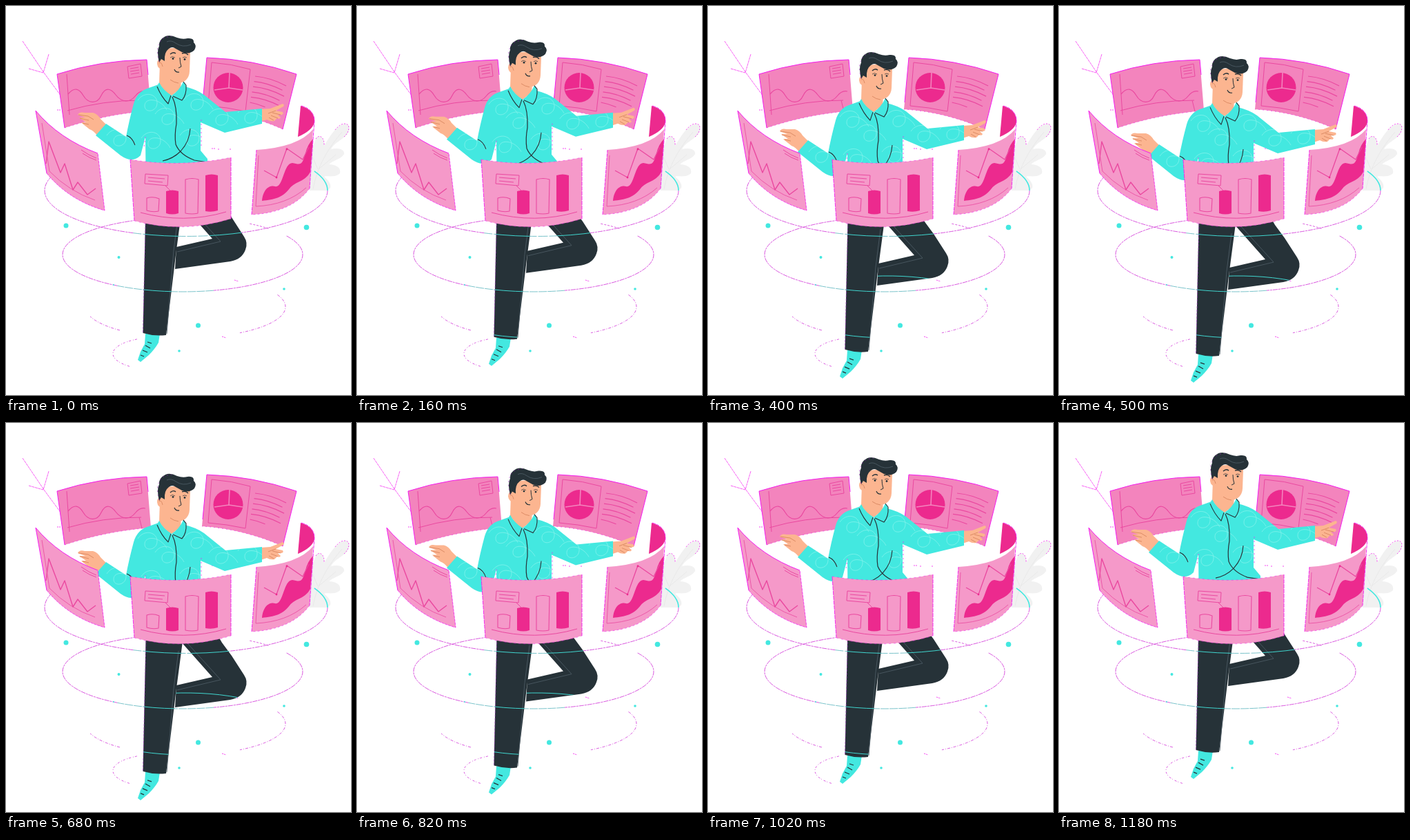
Recreate the animation shown at these times as an HTML page with a canvas. Size 500 by 565 pixels, loop 1.2 s.

```html
<!DOCTYPE html>
<html lang="en">
<head>
<meta charset="utf-8">
<title>Floating charts</title>
<style>
html, body { margin: 0; width: 100%; height: 100%; overflow: hidden; background: #fff; }
canvas { display: block; width: 500px; height: 565px; }
</style>
</head>
<body>
<canvas id="stage" width="500" height="565"></canvas>
<script>
const ctx = document.getElementById('stage').getContext('2d');
const LOOP = 1200, STEP = 20, DROP = 32.5;
const TEAL = '#43e8e0', TEAL_DIM = '#58b4bd', CURL = '#85f1eb', INK = '#263238', SEAM = '#4b5a62';
const SKIN = '#fcb590', SKIN_LINE = '#d98761';
const PINK = '#f599c9', PINK_BACK = '#f384bd', HOT = '#ec2a8e', LINE = '#ea49a0';
const FRINGE = '#f41cf0', RING = '#d02cd6';

function fill(d, color) {
  ctx.fillStyle = color;
  ctx.fill(new Path2D(d));
}
function line(d, color, width = 1, dash = []) {
  ctx.strokeStyle = color;
  ctx.lineWidth = width;
  ctx.setLineDash(dash);
  ctx.stroke(new Path2D(d));
  ctx.setLineDash([]);
}
function dot(x, y, r, color = TEAL) {
  ctx.fillStyle = color;
  ctx.beginPath();
  ctx.arc(x, y, r, 0, 7);
  ctx.fill();
}
// Angles are in degrees, clockwise from the right.
function orbit([x, y, rx, ry], from, to, color = RING, dash = [7, 1, 3, 1], width = 0.8) {
  ctx.strokeStyle = color;
  ctx.lineWidth = width;
  ctx.setLineDash(dash);
  ctx.beginPath();
  ctx.ellipse(x, y, rx, ry, 0, from * Math.PI / 180, to * Math.PI / 180);
  ctx.stroke();
  ctx.setLineDash([]);
}

const RING1 = [261, 268, 205, 66.5];
const RING2 = [256, 361, 174, 54];
const RING3 = [260, 437, 145, 45];
const RING4 = [222, 505, 67, 24];

const STANDING = 'M203 262L198.5 475Q215 480 232 478L246 362L256 286L258 262Z';
const BENT = 'M240 262H298L313 288L327 307L345 335Q351 344 347 354Q342 368 325 371L245 382L247 350L299 338L253 286Z';

function drawScenery() {
  line('M24 51L55 97L80 131', FRINGE, 0.7, [4, 0.6]);
  line('M33 91L54 97L62 70', FRINGE, 0.7, [4, 0.6]);
  line('M74 151H79M298 207H303M307 208H310M324 208H327M331 398L337 400M313 480L319 482', FRINGE, 0.8, [2, 1]);

  fill('M440 268C436 245 440 215 449 193C454 185 462 191 461 203C469 190 478 174 491 171C500 171 499 183 491 190C482 197 474 201 471 208C483 205 491 209 490 215C485 223 474 224 468 230C478 230 486 235 484 243C477 250 466 246 461 248C469 254 476 265 464 268Z', '#f1f1f1');
  line('M445 266C450 240 460 215 487 183M452 237L443 216M453 237L478 216', '#e6e6e6', 0.8);
  line('M449 193C454 185 462 191 461 203M477 180Q484 171 491 171C500 171 498 183 490 190', FRINGE, 0.8, [2, 2]);

  orbit(RING1, 0, 72);
  orbit(RING1, 72, 112, TEAL_DIM, [14, 2]);
  orbit(RING1, 112, 202);
  orbit(RING1, -25, 0, TEAL, [], 1.6);
  orbit(RING2, -30, 75);
  orbit(RING2, 75, 123, TEAL_DIM, [12, 1]);
  orbit(RING2, 123, 246);
  orbit(RING2, 304, 316, RING, [3, 2]);
  orbit(RING3, -23, 57, RING, [4, 2, 1, 2]);
  orbit(RING3, 131, 162, RING, [4, 2, 1, 2]);
  orbit(RING4, 130, 244, RING, [3, 3, 1, 2]);

  [[87, 319, 3.5], [435.5, 321.5, 3.8], [163.5, 365, 2], [278.5, 464, 3.5],
   [403, 411, 1.8], [251, 501, 1.8], [156, 405, 1]].forEach(d => dot(...d));
}

function drawBackPanels() {
  fill('M74 99Q136 79 204 78L210 152Q145 157 85 177Z', PINK_BACK);
  line('M85 177L74 99Q136 79 204 78L206 100', FRINGE, 1);
  line('M85 177Q145 157 210 152', FRINGE, 0.6, [2, 4]);
  line('M88 99L92 158M89 152Q140 137 196 137M193 137L197 153', LINE);
  line('M90 128C99 117 106 120 112 130C119 142 132 143 138 130C145 116 153 121 159 129C168 141 180 140 187 131Q194 122 202 124', LINE, 1.2);
  line('M176 88L195 84L197 102L178 105ZM180 91L192 89M180 95L193 93M181 99L193 97', LINE);

  fill('M291 75Q357 77 421 99L401 179Q345 154 284 150Z', PINK_BACK);
  line('M285 140L291 75Q357 77 421 99L401 179', FRINGE, 1);
  line('M401 179Q345 154 284 150', FRINGE, 0.6, [2, 4]);
  line('M298 82Q327 84 354 92L347 153Q320 147 293 145Z', LINE);
  dot(322, 118.5, 21.5, HOT);
  line('M324 97L323 119L302 122M323 119L343 122', PINK_BACK, 1.6);
  for (let i = 0; i < 6; i++) {
    const x = 361 - i * 1.5, y = 102 + i * 7.6;
    const end = [45, 41, 45, 40, 43, 22][i];
    line(`M${x} ${y}q${end / 2} 2 ${end} ${end * 0.31}`, LINE, 1.2);
  }
}

function drawFrontPanels() {
  fill('M43 152Q77 193 133 214L143 297Q91 282 59 243Z', PINK);
  line('M133 214Q77 193 43 152L59 243', FRINGE, 1);
  line('M59 243Q91 282 143 297L133 214', FRINGE, 0.8, [4, 1]);
  line('M52 170L63 240Q91 269 129 282', LINE, 0.8);
  line('M58 229L62 197L79 242L85 229L97 267L104 256L118 274L130 265', LINE, 1.4);
  line('M109 209Q120 217 131 221M111 214Q121 221 131 224', LINE, 1);

  fill('M363 209Q424 205 445 179L440 265Q414 300 356 303Z', PINK);
  fill('M427 145Q448 151 447 169Q444 181 423 190Z', HOT);
  fill('M371 283C373 263 384 260 390 262C402 265 402 228 415 228C428 231 429 231 434 214Q437 201 445 193L441 241C433 256 420 254 411 265C400 279 389 281 371 283Z', HOT);
  line('M374 239L392 249L407 207L430 223L439 205', LINE, 1.3);
  dot(392, 249, 1.4, HOT);
  dot(407, 208, 1.4, HOT);
  line('M366 217L362 291Q407 289 435 264', LINE, 0.8);
  line('M356 303L363 209M428 145Q446 150 447 166L440 265', FRINGE, 0.9, [5, 1]);
  line('M440 265Q414 300 356 303', FRINGE, 0.6, [3, 3]);

  fill('M180 223Q253 235 326 220V309Q256 331 186 312Z', PINK);
  line('M180 223Q253 235 326 220M186 312Q256 331 326 309', FRINGE, 0.5, [3, 4]);
  line('M180 223L186 312M326 220V309', FRINGE, 0.9, [6, 1]);
  line('M202 244L235 246L234 261L201 258ZM206 249L230 251M206 254L227 256M231 261L238 268', LINE);
  line('M204 279Q213 276 222 280L221 298Q213 300 204 297Z', LINE, 1.1);
  line('M260 252Q270 249 279 252L278 301Q270 303 260 301Z', LINE, 1.1);
  fill('M232 269Q241 266 250 269V301Q241 304 232 301Z', HOT);
  fill('M289 246Q298 243 307 246V297Q298 300 289 298Z', HOT);
  line('M195 300Q258 317 319 299', LINE, 1);
}

function drawLegs(drop) {
  fill('M202 476H223L221 489Q216 498 207 507L195 517L191 514L195 502L201 491Z', TEAL);
  line('M205 488L211 490M202 493L209 497M198 500L205 503M195 507L200 509', INK, 1.2);
  fill(BENT, INK);

  ctx.save();
  ctx.clip(new Path2D(BENT));
  ctx.translate(0, -drop);
  orbit(RING3, 200, 340, TEAL, [], 0.9);
  ctx.restore();

  line('M262 288L311 342L248 357', SEAM, 0.9);
  fill(STANDING, INK);
  line('M250 300L243 355L233 476', SEAM, 0.9);
  line('M203 286L198.5 475', '#9a25bd', 0.6, [3, 2]);

  ctx.save();
  const legs = new Path2D(STANDING);
  legs.addPath(new Path2D(BENT));
  ctx.clip(legs);
  ctx.translate(0, -drop);
  for (const ring of [RING1, RING2, RING3]) orbit(ring, 20, 160, TEAL, [], 0.9);
  ctx.restore();
}

function drawHands() {
  fill('M104 158Q106 153 114 155L126 155Q133 157 137 164L146 173L132 188Q127 181 121 179L111 171L109 169L116 169L106 162L115 162Z', SKIN);
  line('M105 158L119 160L127 165M107 163L120 166M111 170L120 172', SKIN_LINE, 0.9);
  fill('M369 150L383 149L401 142Q404 143 402 146L391 152L401 154Q403 157 399 158L394 158L398 162Q397 165 393 163L389 167Q383 168 378 165L369 168Z', SKIN);
  line('M380 156L391 152M386 155L398 158M384 159L394 163M381 162L388 166', SKIN_LINE, 0.9);
}

function drawShirt() {
  const body = 'M221 114L207 119Q190 124 185 142Q178 168 174 190L145 171L130 188L166 217Q183 229 195 217L202 190L203 285H293L292 222L282 210V169L317 184L371 171V149L318 154L287 129Q276 121 259 117L241 131Z';
  fill(body, TEAL);

  ctx.save();
  ctx.clip(new Path2D(body));
  const curl = 'm-16 -6c9 -14 29 -10 28 5c-1 12 -18 14 -18 3c0 -13 23 -11 32 6';
  const curls = [[207, 143], [232, 163], [212, 198], [274, 142], [310, 164], [352, 161], [162, 194], [268, 194]];
  for (const [x, y] of curls) line(`M${x} ${y}${curl}`, CURL, 0.8);
  ctx.restore();

  line('M175 188Q183 191 187 202', INK, 1.1);
  line('M202 190L200 206M283 165V207', FRINGE, 0.7, [2, 4]);
  line('M241 132Q248 146 247 171Q244 187 246 201Q252 216 273 224L292 227', INK, 1.2);
  line('M267 178Q266 197 253 211Q242 222 227 225', INK, 1.1);
}

function drawHead(blink) {
  fill('M223 82L222 112Q229 124 240 130L253 120L254 106Z', SKIN);
  fill('M228 62L258 60L267 68L266 95Q265 110 250 112Q235 111 229 96Z', SKIN);
  fill('M230 77Q219 74 219 84Q220 93 230 92Z', SKIN);
  line('M222 83Q225 80 227 88', SKIN_LINE, 0.9);
  line('M238 107Q243 111 250 112', SKIN_LINE, 0.9);
  fill('M222 82Q218 66 222 58Q221 49 231 44Q238 41 248 46Q256 49 263 47Q273 46 272 53Q277 57 273 64Q266 71 255 67L246 62Q241 58 236 62Q229 67 230 80L225 77Z', INK);
  line('M233 52Q239 49 246 54Q256 61 268 56', SEAM, 0.9);
  line('M222 81Q217 63 222 55Q225 45 240 44', '#9a25bd', 0.6, [2, 4]);

  line('M238 70Q242 66 246 69M255 69Q260 67 264 71', INK, 1.4);
  if (blink) {
    line('M238 76Q242 73 245 76M256 75Q260 73 263 76', INK, 1.1);
  } else {
    dot(242, 76.5, 1.4, INK);
    dot(259, 77.5, 1.4, INK);
    line('M238 75Q241 72 245 75M256 75Q259 73 262 75', INK, 0.7);
  }
  line('M252 75Q252 82 254 88L250 90', INK, 1);
  line('M244 92Q246 97 251 96', INK, 1.2);

  fill('M222 111Q228 123 240 130L235 142Q225 132 219 116Z', TEAL);
  fill('M240 130Q251 123 257 110Q263 115 261 126L255 138Z', TEAL);
  line('M219 117Q225 132 235 142L239 130M242 131L255 137Q262 129 261 115L257 110', INK, 1.1);
}

// Smooth fall for half the loop, then the same way back up.
function dropAt(time) {
  const u = 1 - Math.abs(time / (LOOP / 2) - 1);
  return DROP * u * u * (3 - 2 * u);
}

function draw(now) {
  const time = Math.floor(now % LOOP / STEP) * STEP;
  const drop = dropAt(time);
  ctx.fillStyle = '#fff';
  ctx.fillRect(0, 0, 500, 565);
  ctx.lineJoin = 'round';
  drawScenery();
  drawBackPanels();
  ctx.save();
  ctx.translate(0, drop);
  drawLegs(drop);
  drawHands();
  drawShirt();
  drawHead(time >= 260 && time < 400);
  ctx.restore();
  drawFrontPanels();
}

function tick() {
  draw(performance.now());
  requestAnimationFrame(tick);
}
tick();
</script>
</body>
</html>
```
